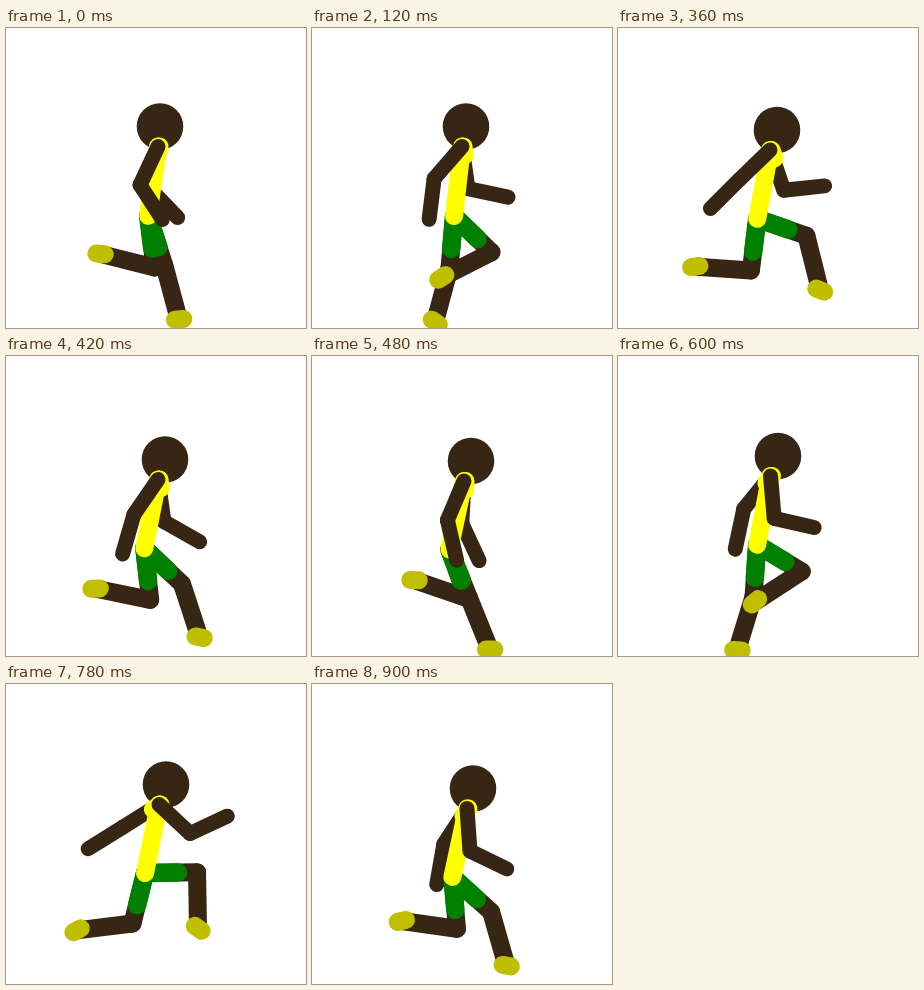
These frames come from a looping animation (300x300 px, 0.96 s). An HTML page without scripts:

```html
<!DOCTYPE html>
<html lang="en">
<head>
<meta charset="utf-8">
<title>Runner</title>
<style>
  @property --x { syntax: "<length>"; inherits: true; initial-value: 0px; }
  @property --y { syntax: "<length>"; inherits: true; initial-value: 0px; }
  @property --head { syntax: "<length>"; inherits: true; initial-value: 0px; }
  @property --lean { syntax: "<angle>"; inherits: true; initial-value: 0deg; }
  @property --near-arm { syntax: "<angle>"; inherits: true; initial-value: 0deg; }
  @property --near-hand { syntax: "<angle>"; inherits: true; initial-value: 0deg; }
  @property --far-arm { syntax: "<angle>"; inherits: true; initial-value: 0deg; }
  @property --far-hand { syntax: "<angle>"; inherits: true; initial-value: 0deg; }
  @property --a-thigh { syntax: "<angle>"; inherits: true; initial-value: 0deg; }
  @property --a-shin { syntax: "<angle>"; inherits: true; initial-value: 0deg; }
  @property --a-foot { syntax: "<angle>"; inherits: true; initial-value: 0deg; }
  @property --b-thigh { syntax: "<angle>"; inherits: true; initial-value: 0deg; }
  @property --b-shin { syntax: "<angle>"; inherits: true; initial-value: 0deg; }
  @property --b-foot { syntax: "<angle>"; inherits: true; initial-value: 0deg; }

  html, body { margin: 0; width: 100%; height: 100%; overflow: hidden; background: #fff; }
  svg { display: block; width: 300px; height: 300px; }
  path { fill: none; stroke-linecap: round; }

  .skin { stroke: #382615; }
  .shirt { stroke: #ff0; stroke-width: 18px; }
  .shorts { stroke: #008000; stroke-width: 18.5px; }
  .shoe { stroke: #bfbf00; stroke-width: 18px; }
  .arm { stroke-width: 15px; }
  .leg { stroke-width: 18px; }

  /* Angles are absolute: 0 hangs straight down, positive swings backward. */
  .near { --upper: var(--near-arm); --lower: var(--near-hand); }
  .far { --upper: var(--far-arm); --lower: var(--far-hand); }
  .a { --upper: var(--a-thigh); --lower: var(--a-shin); --foot: var(--a-foot); }
  .b { --upper: var(--b-thigh); --lower: var(--b-shin); --foot: var(--b-foot); }
  .arm { --bone: 42.5px; }
  .leg { --bone: 52px; }

  .body { transform: translate(var(--x), var(--y)); }
  .head { fill: #382615; transform: translate(var(--head), -20px); }
  .torso { transform: rotate(var(--lean)); }
  .hips { transform: rotate(var(--lean)) translateY(70px) rotate(calc(-1 * var(--lean))); }
  .upper { transform: rotate(var(--upper)); }
  .lower { transform: translateY(var(--bone)) rotate(calc(var(--lower) - var(--upper))); }
  .foot { transform: translateY(56px) rotate(calc(var(--foot) - var(--lower))); }
  .sleeve { transform: translateX(1.5px) rotate(var(--upper)); }

  .runner { animation: body 960ms -1ms infinite, arms 960ms -1ms infinite, legs 960ms -1ms infinite; }

  /* Poses are held for 60 ms each; steps() fills the poses in between. */
  @keyframes body {
    0% { --x: 152px; --y: 118.5px; --head: 2px; --lean: 8deg; animation-timing-function: steps(2); }
    12.5% { --x: 150px; --y: 118.5px; --head: 4px; --lean: 6.5deg; animation-timing-function: steps(2); }
    25% { --x: 151px; --y: 115px; --head: 5px; --lean: 9deg; animation-timing-function: steps(2); }
    37.5% { --x: 152px; --y: 122px; --head: 7px; --lean: 10.5deg; animation-timing-function: steps(2); }
    50% { --x: 152px; --y: 125px; --head: 7px; --lean: 12deg; animation-timing-function: steps(2); }
    62.5% { --x: 152.5px; --y: 120px; --head: 7.5px; --lean: 11deg; animation-timing-function: steps(3); }
    81.25% { --x: 153px; --y: 120.5px; --head: 7px; --lean: 11.5deg; animation-timing-function: steps(2); }
    93.75%, 100% { --x: 155px; --y: 124.5px; --head: 6px; --lean: 12deg; animation-timing-function: steps(1); }
  }
  @keyframes arms {
    0% { --near-arm: 25deg; --near-hand: -33deg; --far-arm: 12deg; --far-hand: -44deg; animation-timing-function: steps(2); }
    12.5% { --near-arm: 41deg; --near-hand: 7deg; --far-arm: -8deg; --far-hand: -78deg; animation-timing-function: steps(3); }
    31.25% { --near-arm: 55deg; --near-hand: 55deg; --far-arm: -26deg; --far-hand: -102deg; animation-timing-function: steps(1); }
    37.5% { --near-arm: 46deg; --near-hand: 45deg; --far-arm: -19deg; --far-hand: -96deg; animation-timing-function: steps(2); }
    50% { --near-arm: 23deg; --near-hand: -13deg; --far-arm: 3deg; --far-hand: -25deg; animation-timing-function: steps(2); }
    62.5% { --near-arm: -5deg; --near-hand: -77deg; --far-arm: 39deg; --far-hand: 12deg; animation-timing-function: steps(3); }
    81.25% { --near-arm: -47deg; --near-hand: -115deg; --far-arm: 58deg; --far-hand: 58deg; animation-timing-function: steps(2); }
    93.75%, 100% { --near-arm: -4deg; --near-hand: -64deg; --far-arm: 33deg; --far-hand: 10deg; animation-timing-function: steps(1); }
  }
  @keyframes legs {
    0% { --a-thigh: -7deg; --a-shin: 104deg; --a-foot: 5deg; --b-thigh: -18deg; --b-shin: -15deg; --b-foot: -5deg; animation-timing-function: steps(2); }
    12.5% { --a-thigh: -46deg; --a-shin: 63deg; --a-foot: -33deg; --b-thigh: 5deg; --b-shin: 15deg; --b-foot: 35deg; animation-timing-function: steps(3); }
    31.25% { --a-thigh: -86deg; --a-shin: -1deg; --a-foot: 28deg; --b-thigh: 14deg; --b-shin: 83deg; --b-foot: -28deg; animation-timing-function: steps(1); }
    37.5% { --a-thigh: -71deg; --a-shin: -14deg; --a-foot: 22deg; --b-thigh: 7deg; --b-shin: 94deg; --b-foot: -8deg; animation-timing-function: steps(2); }
    50% { --a-thigh: -22deg; --a-shin: -22deg; --a-foot: 0deg; --b-thigh: -20deg; --b-shin: 109deg; --b-foot: 3deg; animation-timing-function: steps(2); }
    62.5% { --a-thigh: 4deg; --a-shin: 17deg; --a-foot: 3deg; --b-thigh: -59deg; --b-shin: 57deg; --b-foot: -40deg; animation-timing-function: steps(3); }
    81.25% { --a-thigh: 14deg; --a-shin: 83deg; --a-foot: -28deg; --b-thigh: -91deg; --b-shin: -1deg; --b-foot: 35deg; animation-timing-function: steps(2); }
    93.75%, 100% { --a-thigh: -5deg; --a-shin: 98deg; --a-foot: -13deg; --b-thigh: -48deg; --b-shin: -16deg; --b-foot: 10deg; animation-timing-function: steps(1); }
  }
</style>
</head>
<body>
<svg class="runner" viewBox="0 0 300 300">
  <g class="body">
    <circle class="head" r="23.3"/>

    <g class="arm far"><g class="upper">
      <path class="skin" d="M0 0V42.5"/>
      <g class="lower"><path class="skin" d="M0 0V41"/></g>
    </g></g>

    <g class="hips">
      <g class="leg b"><g class="upper">
        <path class="skin" d="M0 0V52"/>
        <g class="lower"><path class="skin" d="M0 0V54"/></g>
      </g></g>
      <g class="leg a"><g class="upper">
        <path class="skin" d="M0 0V52"/>
        <g class="lower"><path class="skin" d="M0 0V54"/></g>
      </g></g>

      <!-- clothing covers both legs -->
      <g class="leg b"><g class="upper">
        <path class="shorts" d="M0 0V33"/>
        <g class="lower"><g class="foot"><path class="shoe" d="M-4 0H4.5"/></g></g>
      </g></g>
      <g class="leg a"><g class="upper">
        <path class="shorts" d="M0 0V33"/>
        <g class="lower"><g class="foot"><path class="shoe" d="M-4 0H4.5"/></g></g>
      </g></g>
    </g>

    <g class="far"><path class="shirt sleeve" d="M0 0V9"/></g>
    <g class="torso"><path class="shirt" d="M0 0V70"/></g>

    <g class="arm near"><g class="upper">
      <path class="skin" d="M0 0V42.5"/>
      <g class="lower"><path class="skin" d="M0 0V41"/></g>
    </g></g>
  </g>
</svg>
</body>
</html>
```
